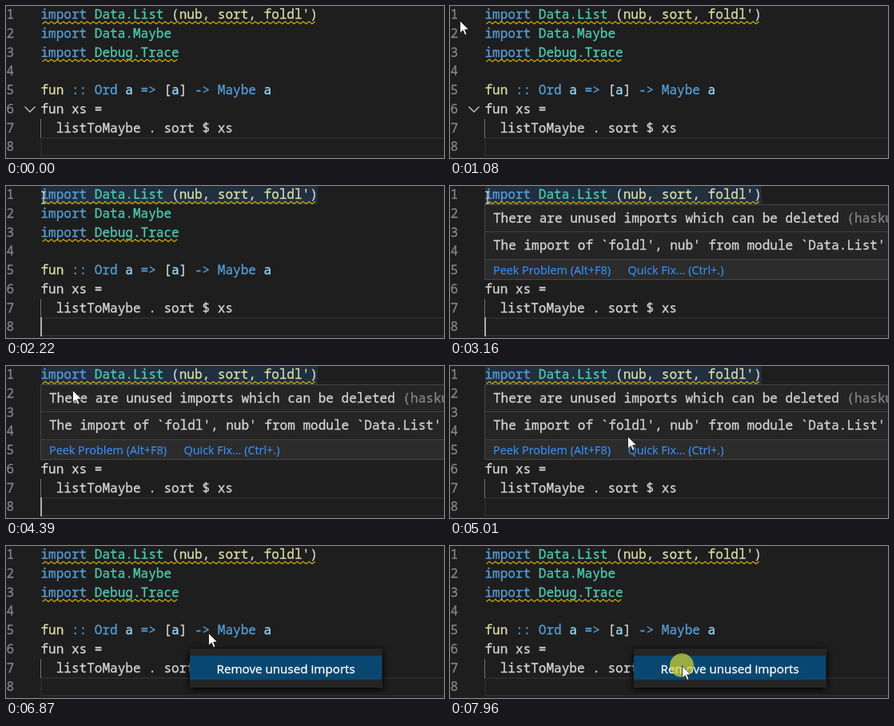
An HTML page for the animation above (8 s loop, 548 by 191 pixels).

```html
<!DOCTYPE html>
<html lang="en">
<head>
<meta charset="utf-8">
<title>Remove unused imports</title>
<style>
  html, body { margin: 0; width: 100%; height: 100%; overflow: hidden; background: #1e1e1e; }
  svg { display: block; }
  text { white-space: pre; color: #d4d4d4; font: 16.04px "Noto Sans Mono", monospace; }
  text, tspan { fill: currentColor; stroke: currentColor; stroke-width: .3; }
  .num { color: #858585; }
  .key { color: #569cd6; }
  .type { color: #4ec9b0; }
  .fn { color: #dcdcaa; }
  .var { color: #9cdcfe; }
  .ui { font-family: "Open Sans", sans-serif; }
  .link { font-size: 14.4px; color: #3794ff; stroke-width: .1; }
  .item { font-size: 15.2px; color: #fff; }
  .wave { fill: none; stroke: #cca700; stroke-width: 1.3; }
</style>
</head>
<body>
<svg width="548" height="191" viewBox="0 0 548 191">
  <rect id="mark" x="44" width="346" height="23" fill="#264f78" opacity=".35"/>
  <rect x="44" y="166" width="510" height="22" fill="none" stroke="#2a2a2a" stroke-width="2"/>
  <path d="M43.5 142V166" stroke="#707070"/>
  <g id="code"></g>
  <path id="fold" d="M23.5 126.5L30 133L36.5 126.5" fill="none" stroke="#c5c5c5" stroke-width="1.4"/>
  <rect id="caret" x="43" y="165" width="2" height="24" fill="#aeafad"/>

  <g id="hover">
    <rect x="43.5" y="23.5" width="520" height="94" fill="#252526" stroke="#454545"/>
    <path d="M44 93H548V117H44Z" fill="#2c2c2d"/>
    <path d="M44 57.5H548M44 92.5H548" stroke="#404041"/>
    <text x="54" y="46">There are unused imports which can be deleted <tspan class="num">(hasku</tspan></text>
    <text x="54" y="80">The import of `foldl', nub' from module `Data.List'</text>
    <text class="ui link" x="54" y="111">Peek Problem (Alt+F8)</text>
    <text class="ui link" x="222.5" y="111">Quick Fix... (Ctrl+.)</text>
  </g>

  <g id="menu">
    <rect x="230" y="129" width="241" height="49" fill="#252526" style="filter:drop-shadow(0 2px 4px #000)"/>
    <rect x="230" y="138" width="240" height="30" fill="#094771"/>
    <text class="ui item" x="263.5" y="160">Remove unused imports</text>
  </g>

  <g id="mouse">
    <circle id="click" r="15" fill="#d8d830" opacity=".7"/>
    <path id="arrow" d="M.5 .5V16L4.2 12.6L6.6 18.4L9 17.4L6.6 11.7H11.6Z" fill="#fff" stroke="#111" stroke-width=".8"/>
    <path id="beam" d="M-3 -7H-1L0 -6L1 -7H3M0 -6V7M-3 8H-1L0 7L1 8H3" fill="none" stroke="#ddd" stroke-width="1.2"/>
  </g>
</svg>
<script>
const $ = id => document.getElementById(id);
const span = (cls, s) => `<tspan class="${cls}">${s}</tspan>`;
const key = s => span('key', s), type = s => span('type', s);
const fn = s => span('fn', s), v = s => span('var', s);

const lines = [
  `${key('import')} ${type('Data.List')} (${fn('nub')}, ${fn('sort')}, ${fn("foldl'")})`,
  `${key('import')} ${type('Data.Maybe')}`,
  `${key('import')} ${type('Debug.Trace')}`,
  '',
  `${fn('fun')} ${key('::')} ${key('Ord')} ${v('a')} ${key('=&gt;')} [${v('a')}] ${key('-&gt;')} ${key('Maybe')} ${v('a')}`,
  'fun xs =',
  '  listToMaybe . sort $ xs',
  ''
];

function wave(x1, y) {
  let d = `M45.5 ${y + 3}`;
  for (let x = 45.5, up = 1; x + 3.75 <= x1; up = 1 - up) d += `L${x += 3.75} ${up ? y : y + 3}`;
  return `<path class="wave" d="${d}"/>`;
}

$('code').innerHTML = lines.map((s, i) => {
  const y = Math.round(16 + 23.75 * i);
  return `<text class="num" x=".5" y="${y}">${i + 1}</text><text x="43.5" y="${y}">${s}</text>`;
}).join('') + wave(390, 19.5) + wave(217, 67);

const blinks = [130, 680, 1180, 1680, 2180, 2680, 3160, 3610, 4160, 4660, 5160, 5640];

// time, x, y of the pointer
const path = [
  [900, 38, 150], [1080, 12, 18], [1680, 2, 20], [1760, 4, 20], [2180, 47, 14],
  [4160, 47, 14], [4930, 215, 87], [5010, 222, 88], [5390, 243, 98],
  [6640, 243, 98], [7410, 287, 148], [7490, 289, 150], [7640, 290, 150], [8000, 290, 150]
];

function pointer(t) {
  const i = Math.max(1, path.findIndex(p => p[0] > t));
  const [t0, x0, y0] = path[i - 1], [t1, x1, y1] = path[i];
  const u = Math.max(0, (t - t0) / (t1 - t0));
  const e = t1 - t0 > 400 ? u * u * (3 - 2 * u) : u;
  return [x0 + (x1 - x0) * e, y0 + (y1 - y0) * e];
}

const clamp = n => Math.min(1, Math.max(0, n));
const show = (id, on) => $(id).style.display = on ? '' : 'none';

function draw(now) {
  const t = now % 8000;
  const [x, y] = pointer(t);
  const beam = x > 42 && y < 23;
  show('caret', blinks.filter(b => b <= t).length % 2);
  show('mark', t >= 2180 && t < 5880);
  show('hover', t >= 2300 && t < 5880);
  $('hover').style.opacity = clamp((t - 2290) / 80);
  $('fold').style.opacity = clamp((2200 - t) / 200);
  show('menu', t >= 5950);
  show('mouse', t >= 900);
  show('arrow', !beam);
  show('beam', beam);
  show('click', t >= 5710 && t < 5880 || t >= 7960);
  $('mouse').setAttribute('transform', `translate(${Math.round(x)} ${Math.round(y)})`);
  requestAnimationFrame(draw);
}
requestAnimationFrame(draw);
</script>
</body>
</html>
```
